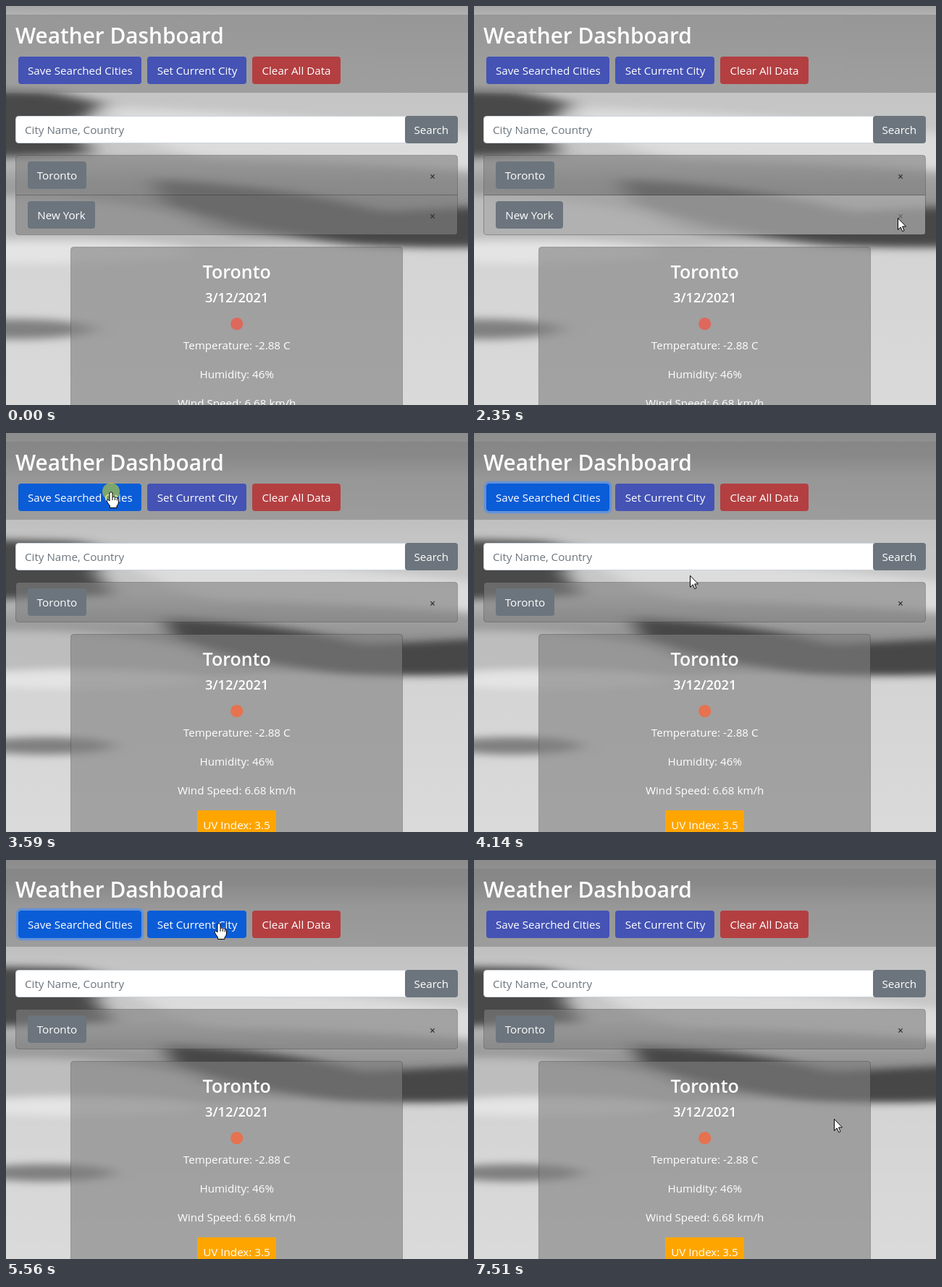
Animation of 638x552 px, one loop 8 s. Source, as an HTML page:

```html
<!DOCTYPE html>
<html lang="en">
<head>
<meta charset="utf-8">
<title>Weather Dashboard</title>
<style>
  html, body { margin: 0; width: 100%; height: 100%; overflow: hidden; background: #999; }
  svg { display: block; width: 638px; height: 552px; --idle: #4453b4; --lit: #0a5cd7; }
  text { font: 15.2px "Open Sans", "Noto Sans", sans-serif; fill: #fff; }
  .title { font-size: 29.8px; font-weight: 600; }
  .city { font-size: 25px; font-weight: 600; }
  .date { font-size: 18.3px; font-weight: 600; }
  .mid text { text-anchor: middle; }
  text.close { font-size: 14px; font-weight: 600; fill: #2f353b; }
  .hint, .grey { fill: #6c757d; }
  .panel { fill: #808080; fill-opacity: .62; stroke: #000; stroke-opacity: .2; }
  .ring { fill: none; stroke: #5590ea; stroke-opacity: .8; stroke-width: 3.2; }
  #cursor path { fill: #fff; stroke: #000; stroke-linejoin: round; }
  #cursor .line { fill: none; }

  /* One shared 8 s clock */
  svg * { animation: 8s linear infinite; }

  /* The second city leaves and the page gets shorter */
  #clouds, #list, #card, #icon, #glow, #hand, #arrow, #press { animation-timing-function: step-end; }
  #clouds { animation-name: zoom; transform-origin: 319px 345px; }
  #list { animation-name: shrink; }
  #card { animation-name: lift; }
  #icon { animation-name: warm; }
  #glow { animation-name: glow; }
  #row { animation-name: leave; }
  @keyframes zoom { 0% { transform: none } 32.25%, 100% { transform: scale(.86) } }
  @keyframes shrink { 0% { height: 110px } 32.25%, 100% { height: 55px } }
  @keyframes lift { 0% { transform: none } 32.25%, 100% { transform: translateY(-55px) } }
  @keyframes warm { 0% { fill: #dd695c } 32.25%, 100% { fill: #e6724f } }
  @keyframes glow { 0% { opacity: 0 } 29.36%, 100% { opacity: 1 } }
  @keyframes leave { 0%, 30.25% { opacity: 1 } 32.25%, 100% { opacity: 0 } }

  /* Button states */
  #save { animation-name: save; }
  #set { animation-name: set; }
  #saveRing { animation-name: saveRing; }
  #setRing { animation-name: setRing; }
  @keyframes save { 0%, 44.85%, 78%, 100% { fill: var(--idle) } 44.86%, 76.1% { fill: var(--lit) } }
  @keyframes set { 0%, 62.5%, 93.8%, 100% { fill: var(--idle) } 64%, 91.9% { fill: var(--lit) } }
  @keyframes saveRing { 0%, 45.9%, 78%, 100% { opacity: 0 } 47.9%, 76.1% { opacity: 1 } }
  @keyframes setRing { 0%, 76.1%, 93.8%, 100% { opacity: 0 } 78%, 91.9% { opacity: 1 } }

  /* Pointer */
  #cursor { animation-name: wander; animation-timing-function: steps(5, start); }
  #hand { animation-name: hand; }
  #arrow { animation-name: arrow; }
  #press { animation-name: press; }
  @keyframes wander {
    0%, 1.86% { transform: translate(427px, 552px) }
    10.6%, 12.6% { transform: translate(581px, 287px) }
    15% { transform: translate(524px, 266px) }
    17.5% { transform: translate(602px, 300px) }
    22.4%, 30.3% { transform: translate(585px, 293px) }
    38%, 44.85% { transform: translate(579px, 274px) }
    44.86%, 48% { transform: translate(145px, 81px) }
    54.7%, 55.7% { transform: translate(400px, 274px) }
    60.4%, 61.5% { transform: translate(412px, 95px) }
    64%, 78% { transform: translate(294px, 87px) }
    80.9%, 82% { transform: translate(410px, 327px) }
    83%, 85% { transform: translate(416px, 357px) }
    89%, 100% { transform: translate(497px, 358px) }
  }
  @keyframes hand { 0%, 48%, 78%, 100% { opacity: 0 } 44.86%, 59.46% { opacity: 1 } }
  @keyframes arrow { 0%, 48%, 78%, 100% { opacity: 1 } 44.86%, 59.46% { opacity: 0 } }
  @keyframes press { 0%, 47.9%, 78%, 93.8%, 100% { opacity: 0 } 44.86%, 76.1%, 91.9% { opacity: 1 } }
</style>
</head>
<body>
<svg viewBox="0 0 638 552">
  <defs>
    <linearGradient id="sky" gradientUnits="userSpaceOnUse" x1="0" y1="-70" x2="0" y2="640">
      <stop offset="0" stop-color="#8a8a8a"/>
      <stop offset=".07" stop-color="#949494"/>
      <stop offset=".12" stop-color="#b4b4b4"/>
      <stop offset=".25" stop-color="#c4c4c4"/>
      <stop offset=".38" stop-color="#c8c8c8"/>
      <stop offset=".44" stop-color="#a0a0a0"/>
      <stop offset=".53" stop-color="#848484"/>
      <stop offset=".57" stop-color="#d4d4d4"/>
      <stop offset="1" stop-color="#dcdcdc"/>
    </linearGradient>
    <filter id="soft" filterUnits="userSpaceOnUse" x="-140" y="-140" width="920" height="880">
      <feGaussianBlur stdDeviation="16 6"/>
    </filter>
  </defs>

  <g id="clouds">
    <rect x="-120" y="-120" width="880" height="840" fill="url(#sky)"/>
    <g filter="url(#soft)">
      <path fill="#4a4a4a" d="M-120 114L60 118 140 136 90 165 120 205-120 214Z"/>
      <path fill="#dcdcdc" d="M130 140Q320 146 470 160T760 190V236Q500 215 300 212 200 205 130 140Z"/>
      <path fill="#bdbdbd" d="M-120 262Q120 255 240 290L340 330-120 340Z"/>
      <path fill="#464646" d="M200 240Q400 250 520 285L760 272V330Q600 338 480 330 340 312 220 275Z"/>
      <ellipse cx="60" cy="340" rx="200" ry="16" fill="#e4e4e4"/>
      <ellipse cx="10" cy="447" rx="110" ry="14" fill="#808080"/>
    </g>
  </g>

  <rect y="12" width="638" height="108" fill="#808080" fill-opacity=".55"/>
  <text class="title" x="13" y="52">Weather Dashboard</text>
  <g class="mid">
    <rect id="save" x="17" y="70" width="170" height="38" rx="4"/>
    <rect id="saveRing" class="ring" x="15.4" y="68.4" width="173.2" height="41.2" rx="5.6"/>
    <text x="102.3" y="95">Save Searched Cities</text>
    <rect id="set" x="195" y="70" width="137" height="38" rx="4"/>
    <rect id="setRing" class="ring" x="193.4" y="68.4" width="140.2" height="41.2" rx="5.6"/>
    <text x="264" y="95">Set Current City</text>
    <rect x="340" y="70" width="122" height="38" rx="4" fill="#b33f41"/>
    <text x="401" y="95">Clear All Data</text>
  </g>

  <rect x="13.5" y="152.5" width="545" height="37" rx="4" fill="#fff" stroke="#ced4da"/>
  <text class="hint" x="26" y="177">City Name, Country</text>
  <g class="mid">
    <rect class="grey" x="551" y="152" width="73" height="38" rx="4"/>
    <text x="587.3" y="177">Search</text>
  </g>

  <rect id="list" class="panel" x="13.5" y="206.5" width="610" height="110" rx="4"/>
  <g class="mid">
    <rect class="grey" x="30" y="215" width="81" height="38" rx="4"/>
    <text x="70.5" y="240">Toronto</text>
    <text class="close" x="589" y="240.5">×</text>
  </g>
  <g id="row" class="mid">
    <path d="M14 261.5H623" stroke="#000" stroke-opacity=".25"/>
    <text class="close" x="589" y="295.5">×</text>
    <path id="glow" d="M14 262H623V313Q623 316 620 316H17Q14 316 14 313Z" fill="#fff" fill-opacity=".25"/>
    <rect class="grey" x="30" y="270" width="93" height="38" rx="4"/>
    <text x="76.5" y="295">New York</text>
  </g>

  <g id="card" class="mid">
    <rect class="panel" x="89.5" y="333.5" width="458" height="330" rx="4"/>
    <text class="city" x="318.7" y="377">Toronto</text>
    <text class="date" x="318.7" y="410">3/12/2021</text>
    <circle id="icon" cx="318.7" cy="439.7" r="8.6"/>
    <text x="318.7" y="475">Temperature: -2.88 C</text>
    <text x="318.7" y="515">Humidity: 46%</text>
    <text x="318.7" y="555">Wind Speed: 6.68 km/h</text>
    <rect x="264" y="577" width="109" height="40" fill="#ffa500"/>
    <text x="318.5" y="603">UV Index: 3.5</text>
  </g>

  <g id="cursor">
    <circle id="press" r="12" fill="#e8e80f" fill-opacity=".52"/>
    <path id="arrow" d="M.5 .5V16.5L4.2 13 6.7 18.7 9 17.7 6.6 12H11.5Z"/>
    <g id="hand">
      <path d="M-2 13V1.8Q0-.8 2 1.8V7.5Q4 6 5.5 8 7.5 7 8.5 9 10.5 8.5 10.5 11V15Q10 18 8 20V22.5H-1.5V20L-5.5 14Q-6.5 11-4.5 11Z"/>
      <path class="line" d="M2 7.5V12M5.3 8.5V12M8.4 9.5V12.5"/>
    </g>
  </g>
</svg>
</body>
</html>
```
